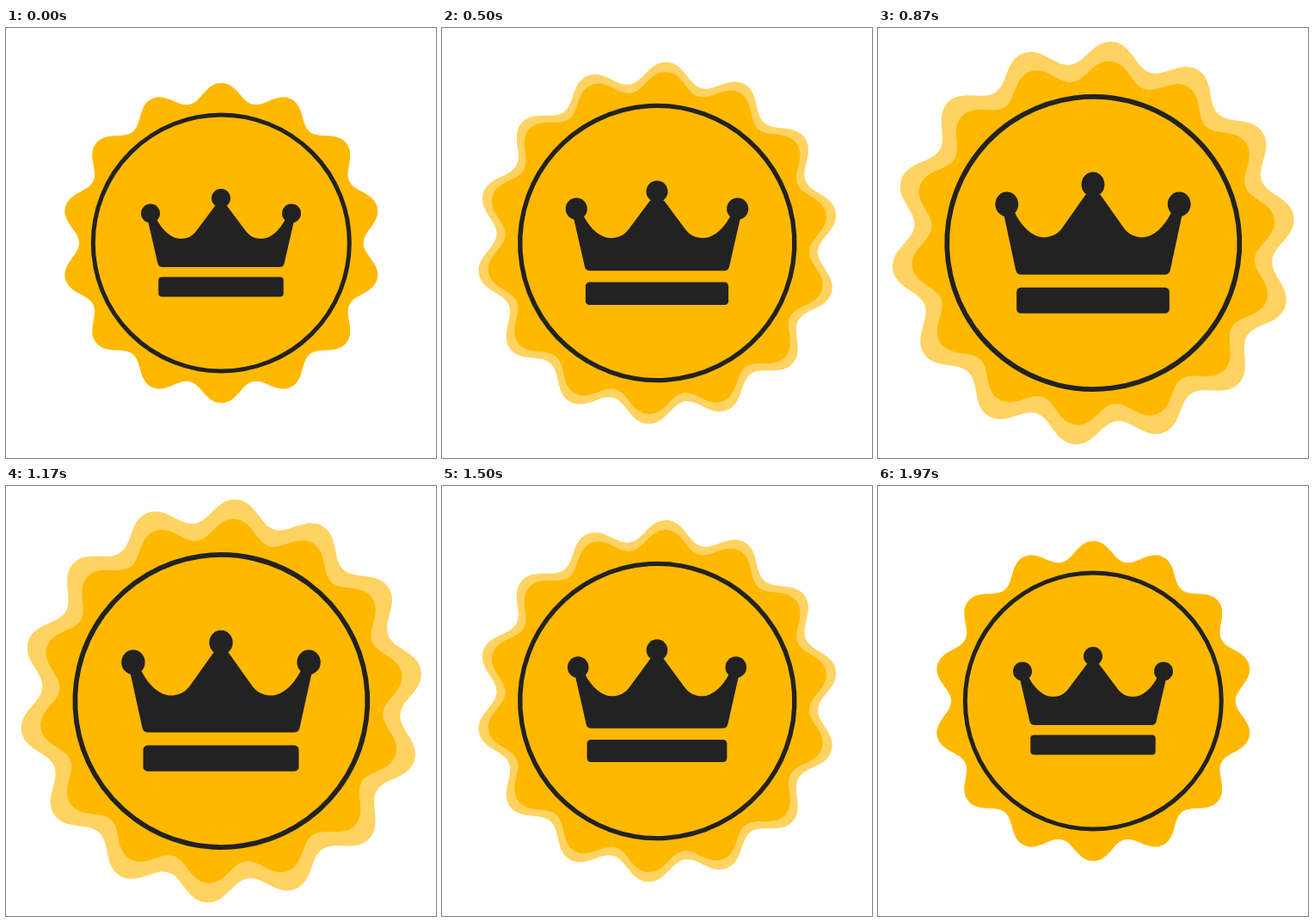
An HTML page that plays this animation: 500 px wide and 500 px high, repeating every 2000 ms.

```html
<!DOCTYPE html>
<html lang="en">
<head>
<meta charset="utf-8">
<title>Crown seal</title>
<style>
  html, body { margin: 0; width: 100%; height: 100%; overflow: hidden; background: #fff; }
  svg { display: block; width: 100%; height: 100%; }
  .gold { fill: #ffb800; }
  .ink { fill: #222; }
</style>
</head>
<body>
<svg viewBox="-250 -250 500 500">
  <g transform="translate(.3 0)">
    <path id="halo" class="gold" opacity=".62"/>
    <g id="seal">
      <path id="badge" class="gold"/>
      <circle r="149" fill="none" stroke="#222" stroke-width="5"/>
    </g>
  </g>
  <g id="crown" class="ink">
    <circle cx="-82" cy="-34.5" r="11"/>
    <circle cy="-52" r="11"/>
    <circle cx="82" cy="-34.5" r="11"/>
    <path d="M-85-26L-73.5 24Q-72.5 28-68 28H68Q72.5 28 73.5 24L85-26L75-28
             C68-14 57-5 47-5C39-5 33-8 28-15L7-43H-7L-28-15
             C-33-8-39-5-47-5C-57-5-68-14-75-28Z"/>
    <rect x="-72.7" y="39.5" width="145.4" height="23" rx="4"/>
  </g>
</svg>
<script>
const LOOP = 2000, HALF = 1000;
const LOBES = 14, MEAN_R = 175.8, WAVE = 10.6;
const SEAL_TURN = 263.2, CROWN_TURN = 382;
const SEAL_GROW = 0.142, HALO_GROW = 0.265, CROWN_GROW = 0.31;

const el = id => document.getElementById(id);
const halo = el('halo'), seal = el('seal'), crown = el('crown');

// a wave with slightly flattened tips
function scallop() {
  const steps = LOBES * 32;
  let d = '';
  for (let i = 0; i < steps; i++) {
    const a = i / steps * 2 * Math.PI, w = LOBES * a;
    const r = MEAN_R + WAVE * (Math.cos(w) - 0.02 * Math.cos(2 * w) - 0.02 * Math.cos(3 * w));
    d += (i ? 'L' : 'M') + (r * Math.sin(a)).toFixed(2) + ' ' + (-r * Math.cos(a)).toFixed(2);
  }
  return d + 'Z';
}

function easeInOutQuart(p) {
  p = Math.min(1, Math.max(0, p));
  return p < 0.5 ? 8 * p ** 4 : 1 - 8 * (1 - p) ** 4;
}

// 30 steps per second, rounded to 10 ms
function stepTime(t) {
  const rest = t % 100;
  return t - rest + (rest < 30 ? 0 : rest < 70 ? 30 : 70);
}

function draw(t) {
  const out = t < HALF;
  const span = out ? t : LOOP - t;
  const e = easeInOutQuart(span / HALF);
  const turn = `rotate(${SEAL_TURN * e})`;
  halo.setAttribute('transform', `${turn} scale(${1 + HALO_GROW * e})`);
  seal.setAttribute('transform', `${turn} scale(${1 + SEAL_GROW * e})`);

  // the crown spins about its vertical axis, a little slower on the way back
  const c = easeInOutQuart(span / (out ? 1005 : 1030));
  const size = 1 + CROWN_GROW * c;
  const flip = Math.abs(Math.cos(CROWN_TURN * c * Math.PI / 180));
  crown.setAttribute('transform', `scale(${size * flip} ${size})`);
}

const outline = scallop();
halo.setAttribute('d', outline);
el('badge').setAttribute('d', outline);

const start = performance.now();
function tick() {
  draw(stepTime((performance.now() - start) % LOOP));
  requestAnimationFrame(tick);
}
draw(0);
requestAnimationFrame(tick);
</script>
</body>
</html>
```
